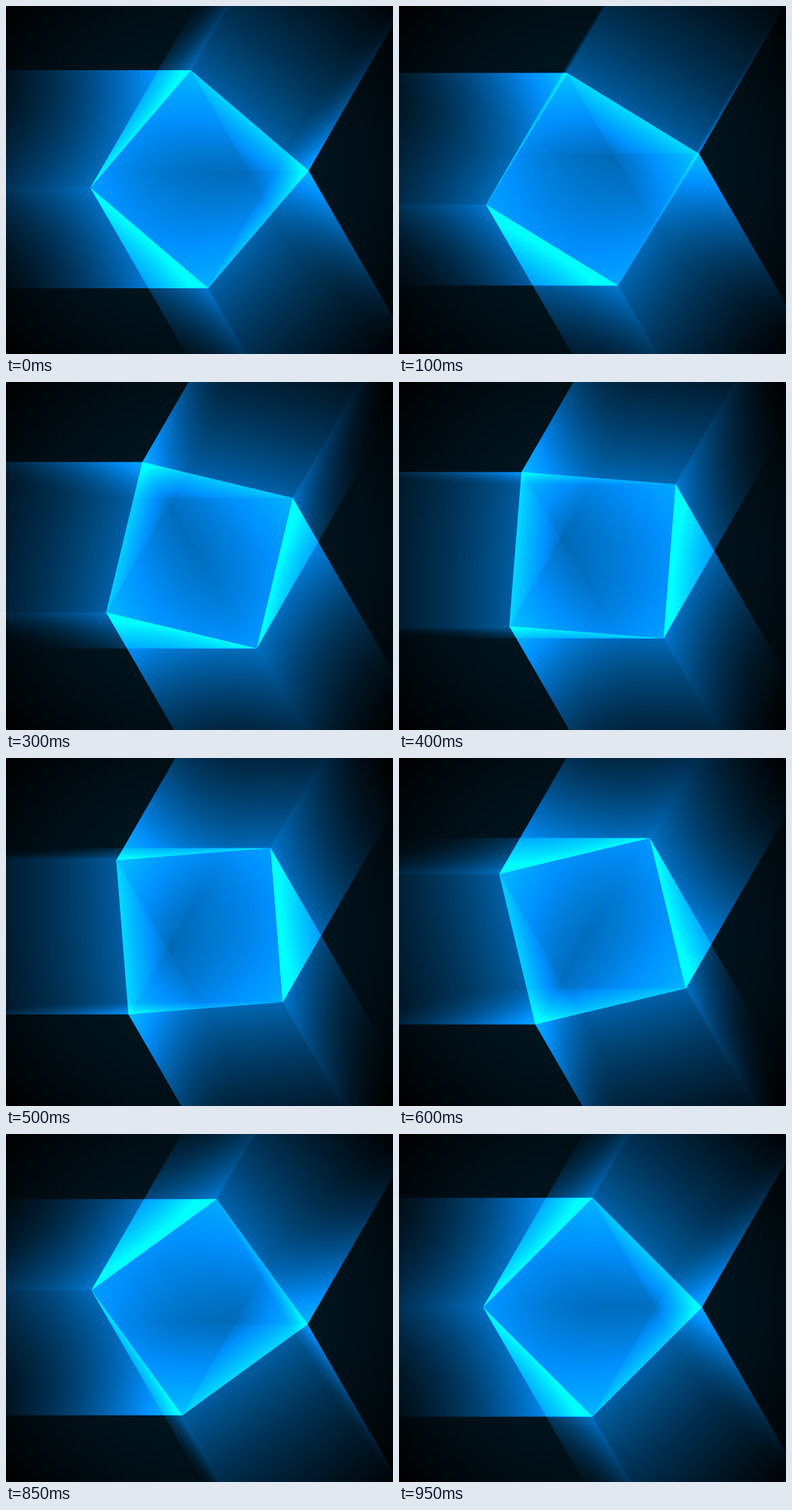
Write an HTML page with a canvas that moves like this. It is 500 px wide and 450 px high and loops after 1000 ms.

```html
<!DOCTYPE html>
<html lang="en">
<head>
<meta charset="utf-8">
<title>Light beams</title>
<style>
html, body { margin: 0; width: 100%; height: 100%; overflow: hidden; background: #000; }
canvas { display: block; }
</style>
</head>
<body>
<canvas id="stage" width="500" height="450"></canvas>
<script>
const W = 500, H = 450, CX = 250, CY = 224, RADIUS = 141.4;
const LOOP = 1000, STEP = 50, REACH = 310;
const BEAMS = [180, 60, -60].map(unit);
const ctx = document.getElementById('stage').getContext('2d');

function unit(deg) {
  const a = deg * Math.PI / 180;
  return { x: Math.cos(a), y: Math.sin(a) };
}

// Colour a gradient by a brightness curve over 0..1.
function shade(gradient, green, blue, curve) {
  for (let i = 0; i <= 12; i++) {
    const k = curve(i / 12);
    gradient.addColorStop(i / 12, `rgb(0,${green * k},${blue * k})`);
  }
  return gradient;
}

function drawBackdrop() {
  const glow = ctx.createRadialGradient(CX, CY, 0, CX, CY, 336);
  ctx.fillStyle = shade(glow, 25, 38, u => 1 - u * u);
  ctx.fillRect(0, 0, W, H);
}

// Sweep edge p-q along d, fading with the distance travelled.
function drawBeam(p, q, d) {
  const len = Math.hypot(q.x - p.x, q.y - p.y);
  const n = { x: (q.y - p.y) / len, y: (p.x - q.x) / len };
  const facing = n.x * d.x + n.y * d.y;
  const depth = facing * REACH;
  if (Math.abs(depth) < 1e-3) return;

  // Edges at a middling slant to the beam glow strongest.
  const c = Math.abs(facing);
  const power = 62 + 132 * c * (1 - c);
  const fade = ctx.createLinearGradient(p.x, p.y, p.x + n.x * depth, p.y + n.y * depth);
  ctx.fillStyle = shade(fade, power, power * 1.8, u => (1 - u) ** 2);

  const dx = d.x * REACH, dy = d.y * REACH;
  ctx.beginPath();
  ctx.moveTo(p.x, p.y);
  ctx.lineTo(q.x, q.y);
  ctx.lineTo(q.x + dx, q.y + dy);
  ctx.lineTo(p.x + dx, p.y + dy);
  ctx.fill();
}

function draw(now) {
  const step = Math.floor((now % LOOP) / STEP);
  const turn = -90 * (step + 1) * STEP / LOOP;
  const corners = [0, 90, 180, 270].map(a => {
    const u = unit(a + turn);
    return { x: CX + u.x * RADIUS, y: CY + u.y * RADIUS };
  });
  ctx.globalCompositeOperation = 'source-over';
  drawBackdrop();
  ctx.globalCompositeOperation = 'lighter';
  for (const d of BEAMS) {
    corners.forEach((p, i) => drawBeam(p, corners[(i + 1) % 4], d));
  }
}

let start;
function tick(now) {
  start ??= now;
  draw(now - start);
  requestAnimationFrame(tick);
}
draw(0);
requestAnimationFrame(tick);
</script>
</body>
</html>
```
